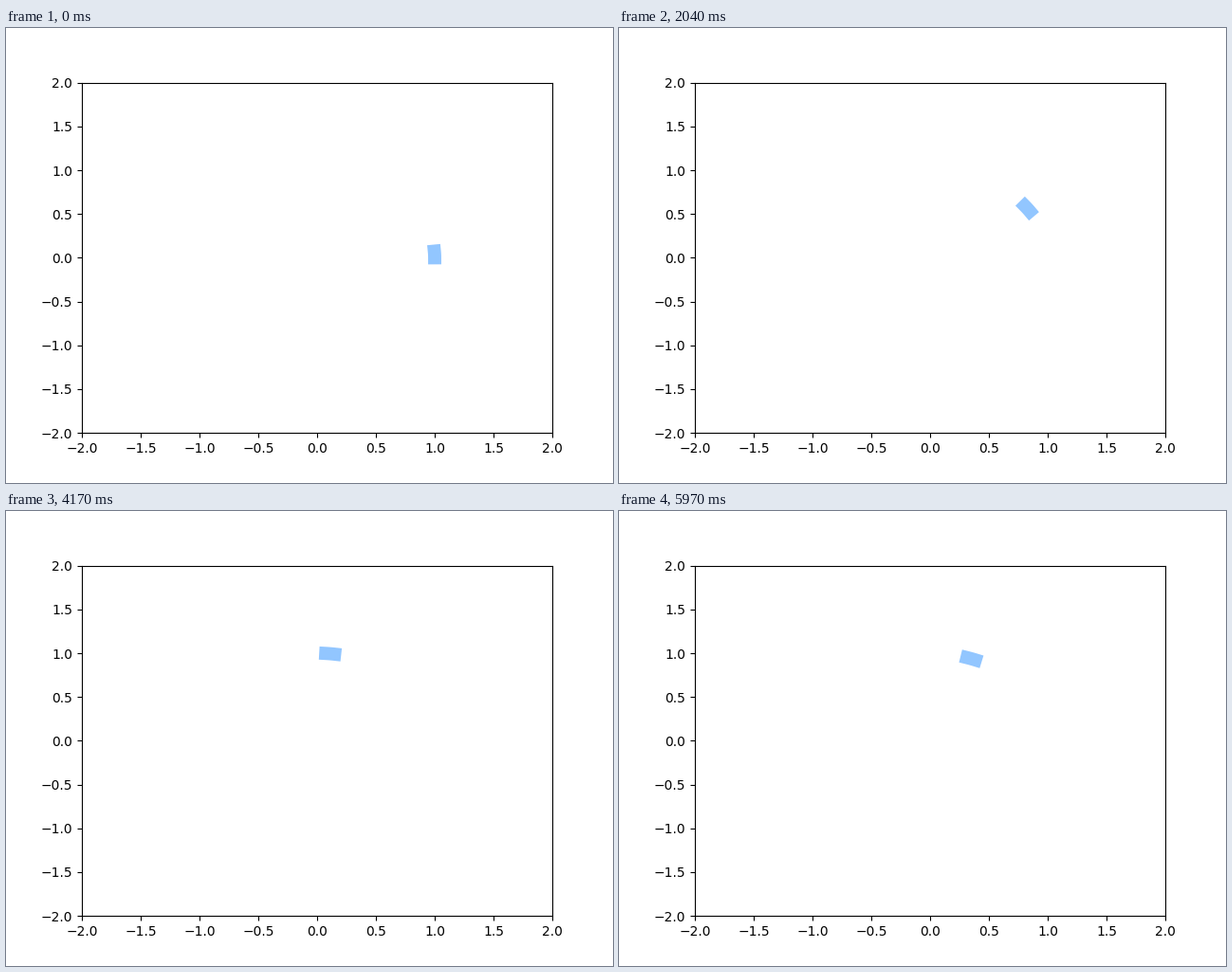
Recreate the animation shown at these times as a matplotlib script. Size 640x480 px, loop 6 s.

```python
import numpy as np
import matplotlib.pyplot as plt
from matplotlib.animation import FuncAnimation

FRAMES = 200
INTERVAL = 30              # ms
STEP = 2 * np.pi / 999     # angle between neighbouring samples
SPEED = 16                 # samples advanced per frame
TRAIL = np.arange(13)      # samples visible at once

fig, ax = plt.subplots(figsize=(6.4, 4.8), dpi=100)
ax.set_xlim(-2, 2)
ax.set_ylim(-2, 2)
line, = ax.plot([], [], color="#92C6FF", lw=10, solid_capstyle="projecting")


def update(i):
    angle = (i * SPEED + TRAIL) * STEP
    line.set_data(np.cos(angle), np.sin(angle))
    return line,


anim = FuncAnimation(fig, update, frames=FRAMES, interval=INTERVAL,
                     repeat=True, repeat_delay=0)
plt.show()
```
